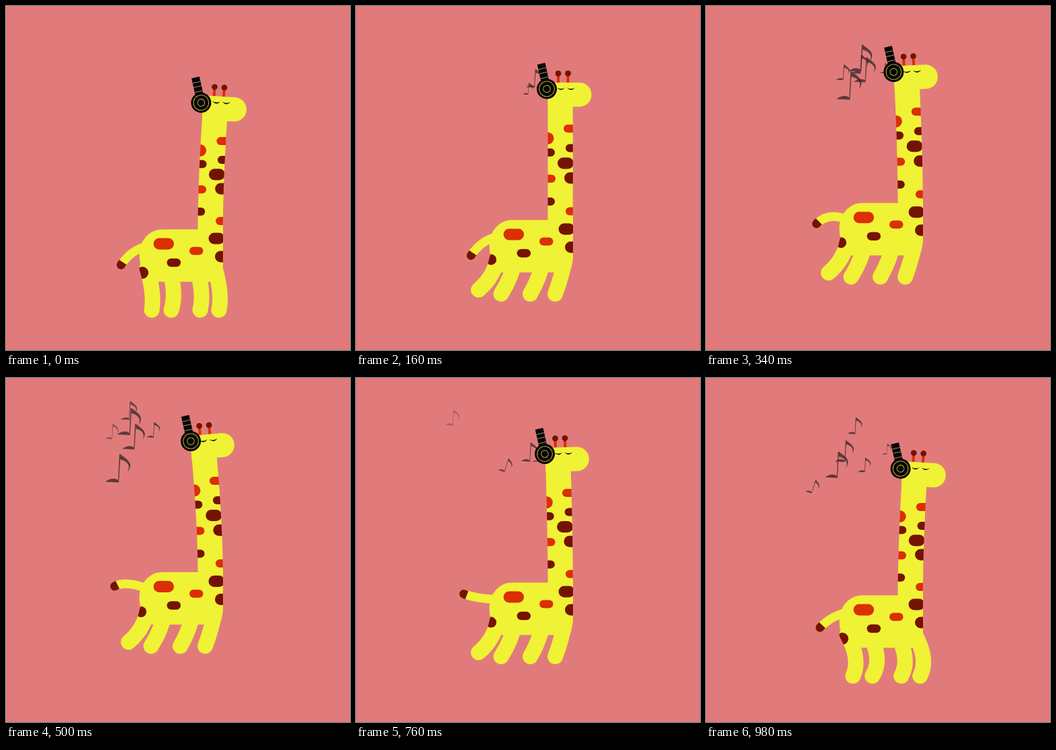
Animation, 512 px wide and 512 px high, one loop 1000 ms. Source, as an HTML page with a canvas:

```html
<!DOCTYPE html>
<html>
<head>
<meta charset="utf-8">
<style>
  html, body { margin: 0; height: 100%; overflow: hidden; background: #e17b7b; }
  canvas { display: block; }
</style>
</head>
<body>
<canvas id="stage" width="512" height="512"></canvas>
<script>
const c = document.getElementById('stage').getContext('2d');
const YELLOW = '#f0f235', ORANGE = '#db2f04', BROWN = '#741302', BLACK = '#070504';
const LOOP = 1000, STEP = 20;
const mix = (a, b, k) => a + (b - a) * k;
const clamp = v => Math.max(0, Math.min(1, v));
const smooth = v => (v = clamp(v), v * v * (3 - 2 * v));

// Smooth monotone curve through one value per shared key time, wrapping around.
const TIMES = [0, 160, 340, 500, 640, 860, 980];
function track(...values) {
  const n = TIMES.length;
  const time = i => TIMES[(i + n) % n] + LOOP * Math.floor(i / n);
  const value = i => values[(i + n) % n];
  const slope = i => (value(i + 1) - value(i)) / (time(i + 1) - time(i));
  const tangent = i => {
    const a = slope(i - 1), b = slope(i);
    return a * b > 0 ? 2 * a * b / (a + b) : 0;
  };
  return t => {
    let i = n - 1;
    while (TIMES[i] > t) i--;
    const h = time(i + 1) - time(i), u = (t - time(i)) / h;
    return mix(value(i), value(i + 1), smooth(u)) +
      h * u * (1 - u) * (tangent(i) * (1 - u) - tangent(i + 1) * u);
  };
}

const lean = track(7.5, 0, -5.5, -10.5, -8.5, 1.5, 6.5);
const tailEnd = track(53, 53, 31, 21, 18, 16.5, 48);
const tailBend = track(30, 30, 13, 12, 17, 29, 31);

// Dip, quick leap, slow descent.
function bodyY(t) {
  if (t < 40) return 332.5 + 7.5 * Math.sin(t / 80 * Math.PI);
  if (t < 500) return 340 - 51 * (1 - (1 - ((t - 40) / 460) ** 1.33) ** 3);
  return 289 + 34.5 * ((t - 500) / 480) ** 1.3;
}
const stretch = t => 1 - .033 * (t < 500 ? 1 - clamp(t / 140) : (t - 500) / 480);
const landing = t => smooth((t - 870) / 110);
const sweep = t => smooth((t - 40) / 105) - landing(t);

// Hip and foot x while standing, then while swept back.
const legs = [[210, 217, 210, 182.5], [243, 246, 237, 216], [284, 289, 279, 259.5], [311, 317, 311, 296.5]];

// Birth time, stem height, starting y, vertical drift per 100 ms.
const notes = [
  [84, 23, 141, -12], [116, 42, 117, 10], [172, 28, 141, -24], [174, 40, 111, -8],
  [197, 38, 120, -4.5], [297, 23, 103, -7], [562, 21, 111, 14.5], [692, 39, 117, 11],
  [732, 32, 125, 0], [785, 25, 107, -12], [835, 22, 133, 5], [948, 27, 116, -6]
];

function fill(color, draw) {
  c.fillStyle = color;
  c.beginPath();
  draw();
  c.fill();
}
const disc = (x, y, r, color) => fill(color, () => c.arc(x, y, r, 0, 7));
const pill = (l, w, y, h, color) => fill(color, () => c.roundRect(l, y - h / 2, w, h, h / 2));

function curve(color, width, x0, y0, x1, y1, x2, y2, cap = 'round') {
  c.strokeStyle = color;
  c.lineWidth = width;
  c.lineCap = cap;
  c.beginPath();
  c.moveTo(x0, y0);
  c.quadraticCurveTo(x1, y1, x2, y2);
  c.stroke();
}

function placed(x, y, angle, draw) {
  c.save();
  c.translate(x, y);
  c.rotate(angle);
  draw();
  c.restore();
}

function drawTail(t, by) {
  const end = tailEnd(t), x = 160 + .3 * (end - 16), y = by + end;
  const bx = 179 + .21 * (end - 16), bend = by + tailBend(t);
  curve(YELLOW, 13, 210, by + 25, bx, bend, x, y);
  placed(x, y, Math.atan2(y - bend, x - bx), () => fill(BROWN, () => {
    c.rect(-5, -6.5, 5.2, 13);
    c.arc(0, 0, 6.5, -Math.PI / 2, Math.PI / 2);
  }));
}

function drawLegs(t, by) {
  const w = sweep(t), k = landing(t);
  legs.forEach(([hip, foot, hip2, foot2], i) => {
    const drop = i ? 110 : 104;
    curve(YELLOW, 23, mix(hip, hip2, w), by + 58,
      mix(hip + 11 + 9.5 * k, hip2 - 5, w), by + mix(95, 85, w),
      mix(foot + 1.7 * k, foot2, w), by + mix(120, drop, w));
  });
}

function drawBody(by) {
  placed(0, by, 0, () => fill(YELLOW, () => {
    c.moveTo(323, -5);
    c.lineTo(300, 0);
    c.lineTo(232, 0);
    c.bezierCurveTo(214, 0, 198.5, 16, 198.5, 38);
    c.quadraticCurveTo(198.5, 62, 215, 78);
    c.lineTo(318, 78);
    c.quadraticCurveTo(323, 65, 323, 52);
  }));
}

function drawSpots(by, s, w, bend) {
  // Spots reach in from the nearer edge of the neck: [inner edge, height above body].
  const edgeSpots = (color, h, list) => {
    for (const [x, up] of list)
      pill(x + bend(up) - (x < 300 ? 24 : 0), 24, by - up * (up > 0 ? s : 1), h, color);
  };
  // Only visible where there is skin beneath.
  c.globalCompositeOperation = 'source-atop';
  edgeSpots(ORANGE, 12, [[309, 136], [297, 61.5], [312, 13]]);
  edgeSpots(BROWN, 12, [[312, 107], [296, 100.5], [296, 27.5]]);
  edgeSpots(ORANGE, 18, [[294.5, 121.5]]);
  edgeSpots(BROWN, 17, [[300, 84.5], [310, 62.5], [301.5, -13.5], [311, -40.5]]);
  pill(219.5, 30.5, by + 21.5, 17, ORANGE);
  pill(273, 20.5, by + 32, 12, ORANGE);
  pill(239.5, 20.5, by + 49.5, 12.5, BROWN);
  disc(mix(203, 201, w), by + mix(64.5, 59, w), mix(9, 8, w), BROWN);
  c.globalCompositeOperation = 'source-over';
}

function drawHead() {
  for (const x of [-3, 11.5]) {
    curve(ORANGE, 4, x, -17, x, -24, x, -30, 'butt');
    disc(x, -31.5, 4.4, BROWN);
  }
  fill(YELLOW, () => c.roundRect(-18.5, -18, 65, 36, [4, 18, 18, 0]));
  for (const x of [1, 16])
    fill(BLACK, () => {
      c.moveTo(x - 6, -10.5);
      c.quadraticCurveTo(x, -3.5, x + 6, -10.5);
      c.quadraticCurveTo(x, -6.8, x - 6, -10.5);
    });
}

function drawPhones() {
  c.fillStyle = BLACK;
  c.fillRect(-6, -38.5, 12, 30);
  for (const y of [-31, -24.5, -17]) curve('#a39a70', .9, -6, y, 0, y, 6, y, 'butt');
  disc(0, 0, 15, BLACK);
  c.strokeStyle = '#b5ad3c';
  c.lineWidth = 1;
  for (const r of [11.3, 5.3]) {
    c.beginPath();
    c.arc(0, 0, r, 0, 7);
    c.stroke();
  }
}

function drawNote(t, [born, size, y, drift]) {
  const age = t - born, life = 550 + Math.min(0, 5 * drift);
  if (age < 0 || age >= life) return;
  const h = size * Math.min(1, .5 + age / 300);
  c.globalAlpha = .75 * clamp(age / 40) * clamp((life - age) / 120);
  placed(278 - .29 * age, y + drift * age / 100, drift > 12 ? .3 : .05, () => {
    c.scale(h, h);
    fill('#302626', () => {
      c.moveTo(0, 0);
      c.lineTo(-.45, 0);
      c.quadraticCurveTo(-.2, -.2, 0, -.08);
      c.lineTo(0, -1);
      c.lineTo(.05, -1);
      c.bezierCurveTo(.2, -.85, .58, -.75, .32, -.38);
      c.bezierCurveTo(.46, -.68, .2, -.78, .04, -.82);
      c.lineTo(.03, 0);
    });
  });
  c.globalAlpha = 1;
}

function draw(t) {
  const by = bodyY(t), b = lean(t), s = stretch(t);
  const bend = up => b * (Math.max(0, up) / 186.5) ** 1.7;
  c.clearRect(0, 0, 512, 512);

  drawLegs(t, by);
  drawBody(by);
  fill(YELLOW, () => {
    for (let up = -50; up <= 190; up += 8) c.lineTo(285.5 + bend(up), by - up * s);
    for (let up = 190; up >= -50; up -= 8) c.lineTo(322.8 + bend(up), by - up * s);
  });
  drawSpots(by, s, sweep(t), bend);
  drawTail(t, by);
  placed(304 + b, by - 186.5 * s, b * 1.6 / 186.5, drawHead);
  for (const note of notes) drawNote(t, note);
  placed(284 + .85 * b, by - 195 * s, -.22, drawPhones);
}

const start = performance.now();
function frame() {
  const t = (performance.now() - start) % LOOP;
  draw(Math.floor(t / STEP) * STEP);
  requestAnimationFrame(frame);
}
frame();
</script>
</body>
</html>
```
